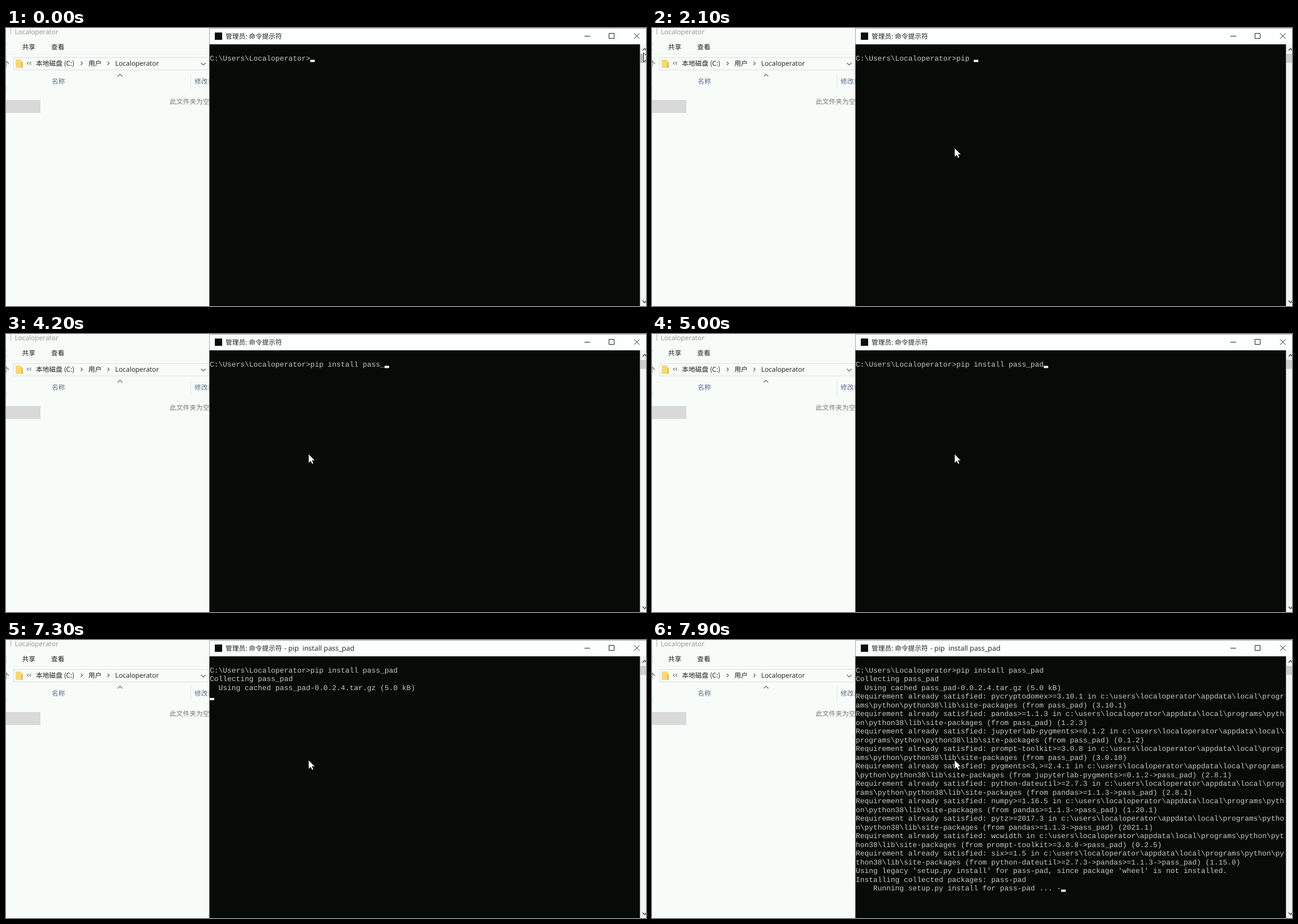
Recreate the animation shown at these times as an HTML page. Size 1134x494 px, loop 8000 ms.

```html
<!DOCTYPE html>
<html lang="zh-CN">
<head>
<meta charset="utf-8">
<style>
  html, body { margin: 0; width: 100%; height: 100%; overflow: hidden; background: #f7fcf9; }
  svg { display: block; }
  text { white-space: pre; text-rendering: geometricPrecision; font: 11.9px "Open Sans", "Noto Sans CJK SC", "Noto Sans CJK", sans-serif; fill: #1c1e1d; }
  .zh { font: 11.75px "Noto Sans CJK SC", "Noto Sans CJK", sans-serif; }
  .mono text { font: 12.91px "Liberation Mono", monospace; fill: #c6cac7; }
  .line { fill: none; stroke: #1c1e1d; }
  .thin { fill: none; stroke: #5d6260; stroke-width: 1.2; }
</style>
</head>
<body>
<svg width="1134" height="494" viewBox="0 0 1134 494">
  <!-- file browser -->
  <path d="M8.5 0V12" stroke="#a9adab"/>
  <path d="M0 7h1" stroke="#b5b9b7"/>
  <text x="15.5" y="11" style="fill:#8f9391">Localoperator</text>
  <text class="zh" x="-10" y="38">页</text>
  <text class="zh" x="28.5" y="38">共享</text>
  <text class="zh" x="80" y="38">查看</text>
  <path d="M0 46.5H360" stroke="#eef2f0"/>
  <path class="thin" d="M0 58V69M-4 63L0 58.5L5 63.5"/>
  <rect x="13.5" y="52.5" width="345" height="22" fill="none" stroke="#dce0de"/>
  <path d="M17 56h10v3h3v12H17z" fill="#f6d878"/>
  <path d="M27 59v12h3v-8z" fill="#e9bf55"/>
  <path class="line" d="M40 60l-2.5 2.5 2.5 2.5M44.5 60l-2.5 2.5 2.5 2.5"/>
  <text class="zh" x="53" y="67">本地磁盘 (C:)</text>
  <path class="thin" d="M132.5 60l3 3-3 3M180 60l3 3-3 3"/>
  <text class="zh" x="146" y="67">用户</text>
  <text x="193.5" y="67">Localoperator</text>
  <path class="thin" d="M345.5 62l4 4 4-4M198 86l4-4 4 4"/>
  <text class="zh" x="81" y="99" style="fill:#566b85">名称</text>
  <path d="M327.5 82V108" stroke="#e1e5e3"/>
  <text class="zh" x="334" y="99" style="fill:#566b85">修改日期</text>
  <path d="M0 102h1v10h-1z" fill="#b9f0f2"/>
  <rect y="128" width="61" height="23" fill="#d8d9d8"/>
  <text class="zh" x="290" y="135" style="fill:#747876">此文件夹为空</text>

  <!-- console window -->
  <rect x="360" width="774" height="494" fill="#a3a8a5"/>
  <rect x="361" y="1" width="773" height="28" fill="#fbfffd"/>
  <rect x="360.5" y="29" width="763" height="465" fill="#060b07"/>
  <rect x="370" y="8" width="13" height="13" fill="#0b0d0c"/>
  <text id="title" class="zh" x="389" y="18.5"></text>
  <text id="task" x="493" y="18.5" style="font-size:12.5px">- pip  install pass_pad</text>
  <path class="line" d="M1025 14.5h10M1068.5 9.5h9v9h-9zM1113 9.5l9.5 9.5M1122.5 9.5l-9.5 9.5"/>
  <rect x="1123.5" y="29" width="10.5" height="465" fill="#f0f4f2"/>
  <rect id="thumb" x="1124" y="46" width="10" height="16"/>
  <path d="M1128 40l3.5-3.5 3.5 3.5M1128 484.5l3.5 3.5 3.5-3.5" fill="none" stroke="#4c504e" stroke-width="1.6"/>
  <g id="rows" class="mono"></g>
  <rect id="pick" x="531.5" y="200" width="7.7" height="15" fill="#f4f8f5"/>
  <rect id="caret" width="8" height="4" fill="#f4f8f5"/>
  <path id="pointer" d="M0 0V16.5L3.8 13L6.3 18.2L9 17L6.6 11.9H11.5Z" fill="#fff" stroke="#0a0d0b" stroke-width=".9"/>
</svg>
<script>
const $ = id => document.getElementById(id);
const COL = 7.745, ROW = 15.48, LEFT = 361;
const prompt = String.raw`C:\Users\Localoperator>`;
const command = 'pip install pass_pad';

// package, requiring package, installed version
const packages = [
  ['pycryptodomex>=3.10.1', '', '3.10.1'],
  ['pandas>=1.1.3', '', '1.2.3'],
  ['jupyterlab-pygments>=0.1.2', '', '0.1.2'],
  ['prompt-toolkit>=3.0.8', '', '3.0.18'],
  ['pygments<3,>=2.4.1', 'jupyterlab-pygments>=0.1.2->', '2.8.1'],
  ['python-dateutil>=2.7.3', 'pandas>=1.1.3->', '2.8.1'],
  ['numpy>=1.16.5', 'pandas>=1.1.3->', '1.20.1'],
  ['pytz>=2017.3', 'pandas>=1.1.3->', '2021.1'],
  ['wcwidth', 'prompt-toolkit>=3.0.8->', '0.2.5'],
  ['six>=1.5', 'python-dateutil>=2.7.3->pandas>=1.1.3->', '1.15.0'],
];
const site = String.raw`c:\users\localoperator\appdata\local\programs\python\python38\lib\site-packages`;
const wrap = s => s.match(/.{1,98}/g);
const output = [
  'Collecting pass_pad',
  '  Using cached pass_pad-0.0.2.4.tar.gz (5.0 kB)',
  ...packages.flatMap(([name, via, version]) =>
    wrap(`Requirement already satisfied: ${name} in ${site} (from ${via}pass_pad) (${version})`)),
  "Using legacy 'setup.py install' for pass-pad, since package 'wheel' is not installed.",
  'Installing collected packages: pass-pad',
  '    Running setup.py install for pass-pad ... -',
];

// [time, value] steps
const typing = [[0, 0], [1400, 1], [1700, 2], [1800, 3], [2100, 4], [2400, 6], [2600, 8], [2700, 9],
  [2900, 10], [3000, 11], [3200, 12], [3400, 13], [3500, 14], [3700, 15], [3800, 16], [4200, 17],
  [4500, 18], [4600, 19], [5000, 20]];
const printing = [[0, 0], [7300, 2], [7600, output.length - 1], [7900, output.length]];
const moves = [[0, 0], [100, .3], [200, .8], [300, 1]];
const at = (steps, t) => steps.findLast(([start]) => start <= t)[1];

const rows = [prompt, ...output].map((s, i) => {
  const el = document.createElementNS('http://www.w3.org/2000/svg', 'text');
  el.setAttribute('x', LEFT);
  el.setAttribute('y', 58 + i * ROW);
  el.textContent = s;
  return $('rows').appendChild(el);
});
const show = (el, on) => el.setAttribute('visibility', on ? 'visible' : 'hidden');
const place = (id, x, y) => $(id).setAttribute('transform', `translate(${x} ${y})`);

function draw(t) {
  const typed = at(typing, t), printed = at(printing, t);
  const selecting = t >= 600 && t < 1400, running = t >= 5500;
  rows[0].textContent = prompt + command.slice(0, typed);
  rows.forEach((el, i) => show(el, i <= printed));

  let col = prompt.length + typed, row = 0;
  if (running) [col, row] = [0, printed + 1];
  if (printed === output.length) [col, row] = [output.at(-1).length, printed];
  place('caret', LEFT + col * COL, 56.5 + row * ROW);

  $('title').textContent = (selecting ? '选择' : '') + '管理员: 命令提示符';
  show($('task'), running);
  show($('pick'), selecting);

  const k = at(moves, t);
  place('pointer', 1129.5 + (536 - 1129.5) * k, 44 + (213 - 44) * k);
  $('thumb').setAttribute('fill', k ? '#cbcfcd' : '#b9bdbb');
}

function loop() {
  draw(performance.now() % 8000);
  requestAnimationFrame(loop);
}
loop();
</script>
</body>
</html>
```
